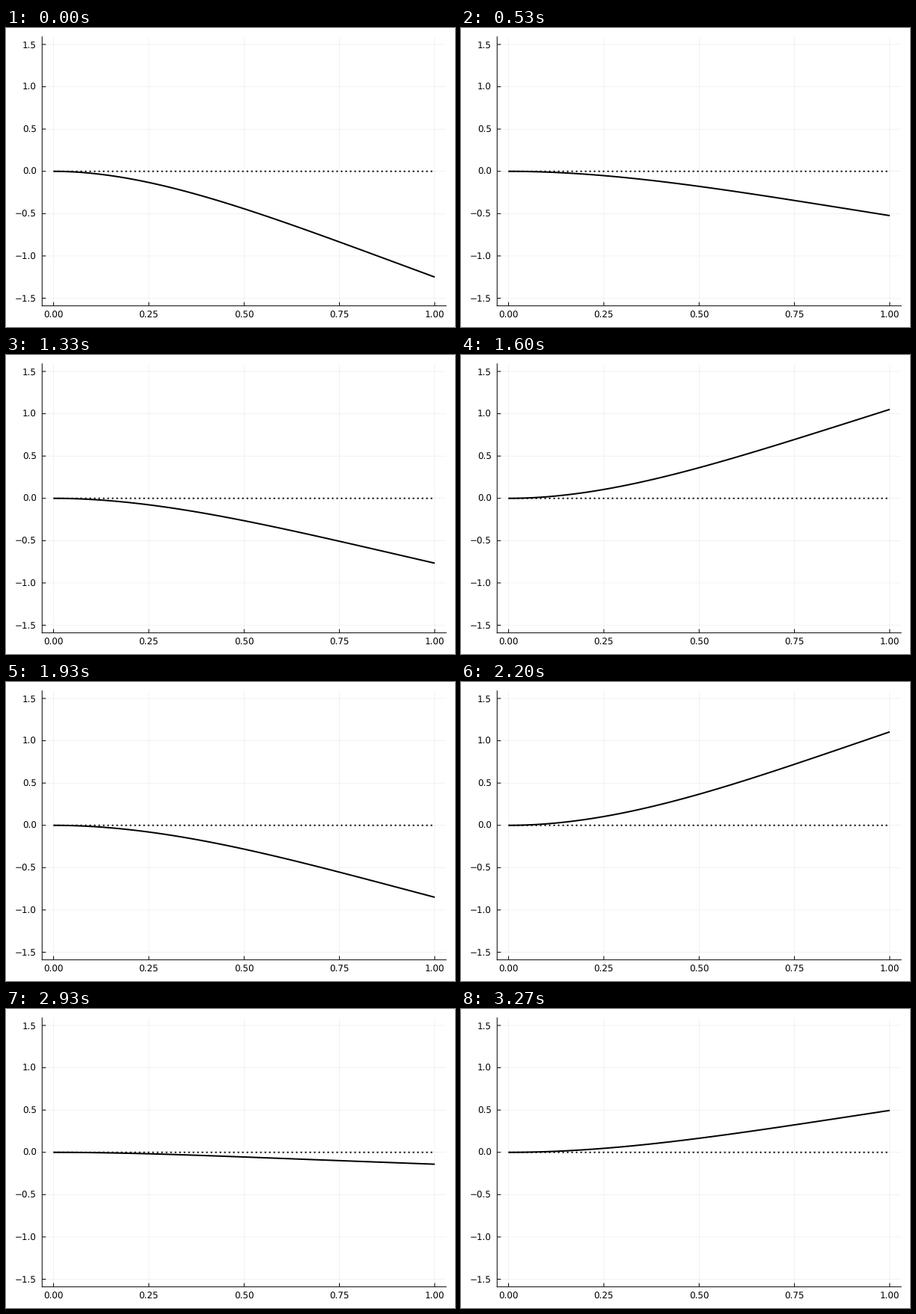
These frames come from a looping animation (600x400 px, 3340 ms). A matplotlib script:

```python
import numpy as np
import matplotlib.pyplot as plt
from matplotlib.animation import FuncAnimation

WIDTH, HEIGHT, DPI = 600, 400, 72
LEFT, RIGHT, TOP, BOTTOM = 48.27, 588.19, 11.81, 371.7
TICK = 5

STEPS, STEPS_PER_SECOND = 50, 15
LOOP_MS, INTERVAL_MS = 3340, 20
DT = 10 / (STEPS - 1)
LOAD = 10

# Cantilever with unit stiffness, mass and length: eigenvalues of its bending modes.
BETAS = np.array([1.8751041, 4.6940911, 7.8547574, 10.9955407, 14.1371684])
x = np.linspace(0, 1, 101)


def mode_shape(beta):
    sigma = (np.cosh(beta) + np.cos(beta)) / (np.sinh(beta) + np.sin(beta))
    shape = np.cosh(beta * x) - np.cos(beta * x) - sigma * (np.sinh(beta * x) - np.sin(beta * x))
    return -LOAD * 2 * sigma / beta**5 * shape


modes = np.array([mode_shape(b) for b in BETAS])
half_step = np.arctan(BETAS**2 * DT / 2)


def deflection(step):
    """Trapezoidal time stepping from the loaded shape, with zero starting acceleration."""
    if step == 0:
        return -LOAD * (6 * x**2 - 4 * x**3 + x**4) / 24
    return (np.cos(half_step) * np.cos((2 * step - 1) * half_step)) @ modes


plt.rcParams.update({"font.family": "DejaVu Sans", "text.hinting": "none",
                     "path.snap": False})
fig = plt.figure(figsize=(WIDTH / DPI, HEIGHT / DPI), dpi=DPI, facecolor="white")
ax = fig.add_axes([LEFT / WIDTH, 1 - BOTTOM / HEIGHT,
                   (RIGHT - LEFT) / WIDTH, (BOTTOM - TOP) / HEIGHT])
xticks, yticks = np.linspace(0, 1, 5), np.linspace(-1.5, 1.5, 7)
ax.set(xlim=(-0.03, 1.03), ylim=(-1.59, 1.59), xticks=xticks, yticks=yticks)
ax.xaxis.set_major_formatter("{x:.2f}")
ax.yaxis.set_major_formatter("{x:.1f}")
ax.spines[["top", "right"]].set_visible(False)
ax.spines[["left", "bottom"]].set_linewidth(1)
ax.set_axisbelow(True)
ax.grid(color="black", alpha=0.1, linewidth=0.5)
ax.tick_params(length=0, labelsize=11.9)
ax.tick_params(axis="x", pad=7)
ax.tick_params(axis="y", pad=7.5)

# Tick marks as plain lines, so they keep their fractional pixel positions.
ax.vlines(xticks, 0, TICK / (BOTTOM - TOP), color="black", linewidth=1,
          transform=ax.get_xaxis_transform())
ax.hlines(yticks, 0, TICK / (RIGHT - LEFT), color="black", linewidth=1,
          transform=ax.get_yaxis_transform())

ax.plot([0, 1], [0, 0], color="black", linewidth=2, linestyle=(0, (1, 2)),
        dash_capstyle="butt")
beam, = ax.plot([], [], color="black", linewidth=2, solid_capstyle="butt")


def draw(frame):
    seconds = (frame + 0.75) * INTERVAL_MS / 1000
    step = min(int(seconds * STEPS_PER_SECOND), STEPS - 1)
    beam.set_data(x, deflection(step))
    return beam,


animation = FuncAnimation(fig, draw, frames=LOOP_MS // INTERVAL_MS, interval=INTERVAL_MS,
                          repeat=True, repeat_delay=0)
plt.show()
```
